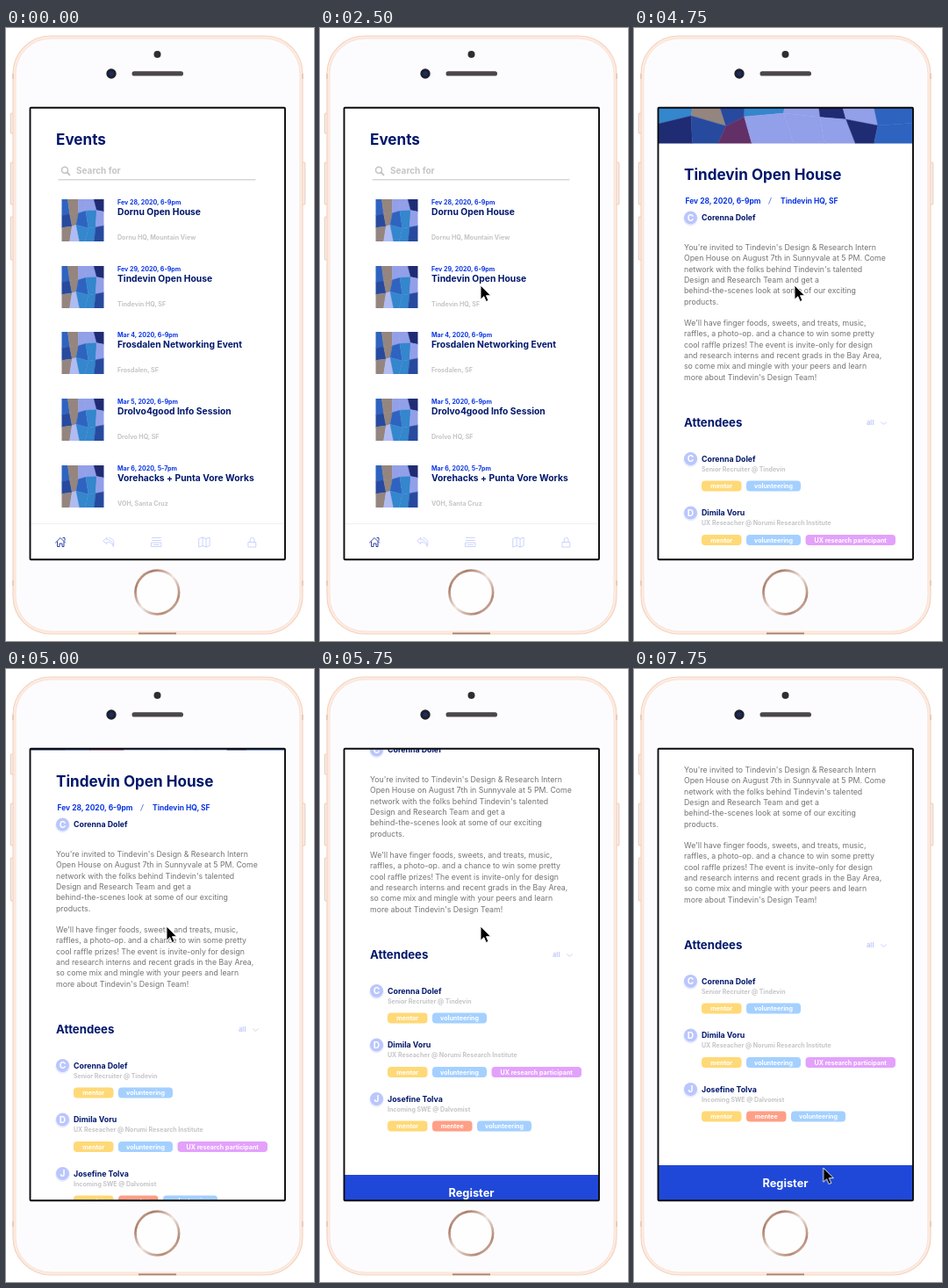
Animation, 351 px wide and 698 px high, one loop 8000 ms. Source, as an HTML page:

```html
<!DOCTYPE html>
<html lang="en">
<head>
<meta charset="utf-8">
<title>Events app</title>
<style>
html, body { margin: 0; width: 100%; height: 100%; overflow: hidden; background: #fff; }
svg { display: block; width: 351px; height: 698px; }
text { font-family: Inter, "Open Sans", sans-serif; font-weight: 700; white-space: pre; }
.h { fill: #00176b; }
.date { fill: #0a35e2; }
.mute { fill: #c5c5c9; }
.body { fill: #737376; font-weight: 400; }
.white { fill: #fff; }
.icon { fill: none; stroke: #c6d0fc; stroke-width: .9; stroke-linejoin: round; stroke-linecap: round; }
</style>
</head>
<body>
<svg viewBox="0 0 351 698" xmlns="http://www.w3.org/2000/svg">
  <defs>
    <clipPath id="screen"><rect x="28" y="91" width="290" height="514"/></clipPath>
    <clipPath id="banner"><rect width="290" height="83.5"/></clipPath>
    <clipPath id="square"><rect width="48" height="48"/></clipPath>
    <linearGradient id="copper" x1="0" y1="0" x2="1" y2="1" spreadMethod="repeat">
      <stop offset="0" stop-color="#ead5c9"/><stop offset=".2" stop-color="#a97c67"/>
      <stop offset=".5" stop-color="#f3e7e0"/><stop offset=".8" stop-color="#b48975"/>
      <stop offset="1" stop-color="#ead5c9"/>
    </linearGradient>
    <g id="thumb" clip-path="url(#square)"></g>
  </defs>

  <g id="buttons" fill="#fdeee6" stroke="#dfbfae" stroke-width=".8"></g>
  <rect x="8" y="9" width="330" height="681" rx="43" fill="#fdece2" stroke="#f4d3c1" stroke-width="1.2"/>
  <rect x="11" y="12" width="324" height="675" rx="40" fill="#fcfcfe" stroke="#fae1d4"/>
  <path d="M8 52v6M338 52v6M8 629v6M338 629v6" stroke="#e8cbbb" stroke-width="2"/>
  <rect x="151" y="688.5" width="43" height="1.8" fill="#a8806d"/>
  <circle cx="172.5" cy="30" r="4" fill="#302d31"/>
  <circle cx="120" cy="52" r="5.7" fill="#20202c"/>
  <circle cx="120" cy="52" r="2.8" fill="#1b2c5e"/>
  <rect x="143.5" y="49.3" width="58.5" height="5.2" rx="2.6" fill="#4b4749"/>
  <circle cx="172.3" cy="642.5" r="24.8" fill="#fefeff" stroke="url(#copper)" stroke-width="2.7"/>

  <rect x="28" y="91" width="290" height="514" fill="#fff"/>
  <g clip-path="url(#screen)">
    <g id="list"></g>
    <g id="page"></g>
  </g>
  <rect x="27.5" y="90.7" width="290.5" height="514.6" rx="1" fill="none" stroke="#0b0b0d" stroke-width="1.9"/>
  <path id="cursor" d="M0 0V16.2L3.8 12.7L6.3 18.5L9 17.3L6.5 11.7H11.6Z" stroke="#fff" stroke-width=".9"/>
</svg>
<script>
const $ = id => document.getElementById(id);
const text = (x, y, size, cls, str, anchor = 'start') =>
  `<text x="${x}" y="${y}" font-size="${size}" class="${cls}" text-anchor="${anchor}">${str}</text>`;

const button = (x, y, h) => `<rect x="${x}" y="${y}" width="3.5" height="${h}" rx="1"/>`;
$('buttons').innerHTML = button(5.3, 97, 23) + button(5.3, 153, 48) + button(5.3, 215, 49) + button(337.3, 153, 48);

// Patchwork mural: a jittered grid, one letter per patch
const tones = { t: '#94857f', p: '#929fe9', w: '#b0bbf1', b: '#2f63c0', s: '#3486cd', n: '#1f2c74', d: '#274a9f', m: '#623066' };
function mural(w, h, rows, seed) {
  const rand = () => (seed = (seed * 16807) % 2147483647) / 2147483647 - 0.5;
  const cw = w / rows[0].length, ch = h / rows.length;
  const grid = Array.from({ length: rows.length + 1 }, (_, r) =>
    Array.from({ length: rows[0].length + 1 }, (_, c) => {
      const edgeX = c % rows[0].length ? rand() * 0.7 : c ? 0.3 : -0.3;
      const edgeY = r % rows.length ? rand() * 0.6 : r ? 0.3 : -0.3;
      return [(c + edgeX) * cw, (r + edgeY) * ch];
    }));
  return rows.map((row, r) => [...row].map((key, c) => {
    const corners = [grid[r][c], grid[r][c + 1], grid[r + 1][c + 1], grid[r + 1][c]];
    return `<polygon points="${corners.join(' ')}" fill="${tones[key]}" stroke="${tones[key]}" stroke-width=".4"/>`;
  }).join('')).join('');
}
$('thumb').innerHTML = mural(48, 48, ['btppn', 'dtbsp', 'twssd'], 11);

// Event list
const events = [
  ['Fev 28, 2020, 6-9pm', 'Dornu Open House', 'Dornu HQ, Mountain View'],
  ['Fev 29, 2020, 6-9pm', 'Tindevin Open House', 'Tindevin HQ, SF'],
  ['Mar 4, 2020, 6-9pm', 'Frosdalen Networking Event', 'Frosdalen, SF'],
  ['Mar 5, 2020, 6-9pm', 'Drolvo4good Info Session', 'Drolvo HQ, SF'],
  ['Mar 6, 2020, 5-7pm', 'Vorehacks + Punta Vore Works', 'VOH, Santa Cruz']
];
const eventRow = ([date, name, place], i) => `<g transform="translate(0 ${Math.round(i * 75.65)})">
  <use href="#thumb" x="63.5" y="195"/>` +
  text(127, 200.7, 7.1, 'date', date) + text(127, 213, 10.3, 'h', name) +
  text(127, 240.5, 7.1, 'mute', place) + '</g>';

const icons = [
  'M-5.5 .5L0-5L5.500 .5M-3.500-.5V5H-1V1.500H2V5H4V-.5M3-5H5V-2',
  'M-2-5L-6-1.500L-2 2V0C2 0 4.500 1 5.500 5C7-1-2-4-2-3ZM1-5C5-4.500 7-1 6 3',
  'M-5-5H5M-5-2H5M-5.500 .5H5.500V5H-5.500ZM-3 2.800H3',
  'M-6-4L-2-5.500L2-4L6-5.500V4L2 5.500L-2 4L-6 5.500ZM-2-5.500V4M2-4V5.500',
  'M-4.500 0H4V5.500H-4.500ZM-2.600 0V-2.600A2.400 2.600 0 0 1 2.200-2.600V0'
];
const tabs = '<path d="M28 564.5H318" stroke="#f0f0f4"/>' + icons.map((d, i) =>
  `<path class="icon" d="${d}" transform="translate(${62 + i * 54.7} 585.5)" ${i ? '' : 'style="stroke:#1d2f9c"'}/>`).join('');

$('list').innerHTML = text(57, 132.7, 17.1, 'h', 'Events') +
  `<g fill="none" stroke="#c3c3c7" stroke-linecap="round">
    <circle cx="67" cy="161.8" r="3.5" stroke-width="1.5"/>
    <path d="M69.7 164.5l2.800 2.800" stroke-width="1.8"/>
    <path d="M60 172.8H284"/></g>` +
  text(80, 165.8, 10, 'mute', 'Search for') + events.map(eventRow).join('') + tabs;

// Event page
const chipKinds = {
  mentor: ['#ffd977', 45.5], mentee: ['#ff9f86', 45.5],
  volunteering: ['#a4d0ff', 62], 'UX research participant': ['#e3a1fb', 102.5]
};
function chips(labels, y) {
  let x = 77;
  return labels.map(label => {
    const [fill, w] = chipKinds[label], left = x;
    x += w + 5.5;
    return `<rect x="${left}" y="${y}" width="${w}" height="12" rx="4" fill="${fill}"/>` +
      text(left + w / 2, y + 8.5, 7.1, 'white', label, 'middle');
  }).join('');
}
const avatar = (y, name) =>
  `<circle cx="64.5" cy="${y + 1.2}" r="8.3" fill="#e9edff"/><circle cx="64.5" cy="${y}" r="7.5" fill="#bac6fc"/>` +
  text(64.5, y + 3.7, 10.2, 'white', name[0], 'middle') + text(77, y + 3.2, 8.8, 'h', name);
const guests = [
  ['Corenna Dolef', 'Senior Recruiter @ Tindevin', ['mentor', 'volunteering']],
  ['Dimila Voru', 'UX Reseacher @ Norumi Research Institute', ['mentor', 'volunteering', 'UX research participant']],
  ['Josefine Tolva', 'Incoming SWE @ Dalvomist', ['mentor', 'mentee', 'volunteering']]
];
const guestRow = ([name, role, labels], i) => {
  const y = 533.5 + i * 61.5;
  return avatar(y, name) + text(77, y + 14, 7, 'mute', role) + chips(labels, y + 25);
};
const copy = [
  "You're invited to Tindevin's Design &amp; Research Intern",
  'Open House on August 7th in Sunnyvale at 5 PM. Come',
  "network with the folks behind Tindevin's talented",
  'Design and Research Team and get a',
  'behind-the-scenes look at some of our exciting',
  'products.', '',
  "We'll have finger foods, sweets, and treats, music,",
  'raffles, a photo-op. and a chance to win some pretty',
  'cool raffle prizes! The event is invite-only for design',
  'and research interns and recent grads in the Bay Area,',
  'so come mix and mingle with your peers and learn',
  "more about Tindevin's Design Team!"
];
const dots = [0, 1, 2].map(i => `<circle cx="302" cy="${109 + i * 5.4}" r="1.5" fill="#fff"/>`).join('');

$('page').innerHTML = '<rect x="28" y="91" width="290" height="700" fill="#fff"/>' +
  `<g transform="translate(28 91)" clip-path="url(#banner)">${mural(290, 83.5, ['btbsspwb', 'stdspnpb', 'ndmpppnb'], 29)}</g>` +
  '<path d="M55 113.8H46.500M50.500 109.500L46.200 113.800L50.500 118.100" fill="none" stroke="#fff" stroke-width="2.1"/>' + dots +
  text(57, 216.3, 17.1, 'h', 'Tindevin Open House') +
  text(58.5, 243, 8.45, 'date', 'Fev 28, 2020, 6-9pm') +
  '<path d="M153.5 243.500l3-7.500" stroke="#5b76e6" stroke-width=".9"/>' +
  text(167, 243, 8.45, 'date', 'Tindevin HQ, SF') + avatar(259, 'Corenna Dolef') +
  copy.map((line, i) => text(57, 296.2 + i * 12.28, 8.75, 'body', line)).join('') +
  text(57, 496.7, 13.2, 'h', 'Attendees') +
  '<text x="265" y="495" font-size="7.5" fill="#c0cbfb">all</text>' +
  '<path class="icon" d="M281.5 491.800l3 2.500 3-2.500"/>' +
  guests.map(guestRow).join('') +
  '<rect x="28" y="743" width="290" height="41" fill="#2048d8"/>' +
  text(172.5, 767.6, 12.8, 'white', 'Register', 'middle');

// Held steps: [ms, ...values]
const LOOP = 8000;
const play = (el, steps, toFrame) => {
  const frames = steps.map(([ms, ...v]) => ({ offset: ms / LOOP, easing: 'steps(1, end)', ...toFrame(...v) }));
  frames.push({ ...frames[frames.length - 1], offset: 1 });
  el.animate(frames, { duration: LOOP, iterations: Infinity });
};
play($('cursor'), [
  [0, -40, -40], [750, 291.5, 108.5], [1000, 265.5, 142], [1250, 203, 238], [1500, 203, 247.5],
  [2000, 191.5, 270], [2250, 183, 293], [7000, 187, 501], [7250, 186, 503], [7500, 215, 556.5], [7750, 215.7, 568]
], (x, y) => ({ transform: `translate(${x}px, ${y}px)` }));
play($('page'), [
  [0, 0, 0], [3750, 0, 1], [4750, 43, 1], [5000, 82, 1], [5500, 159, 1], [5750, 167, 1], [6250, 178, 1]
], (scroll, opacity) => ({ transform: `translateY(${-scroll}px)`, opacity }));
</script>
</body>
</html>
```
